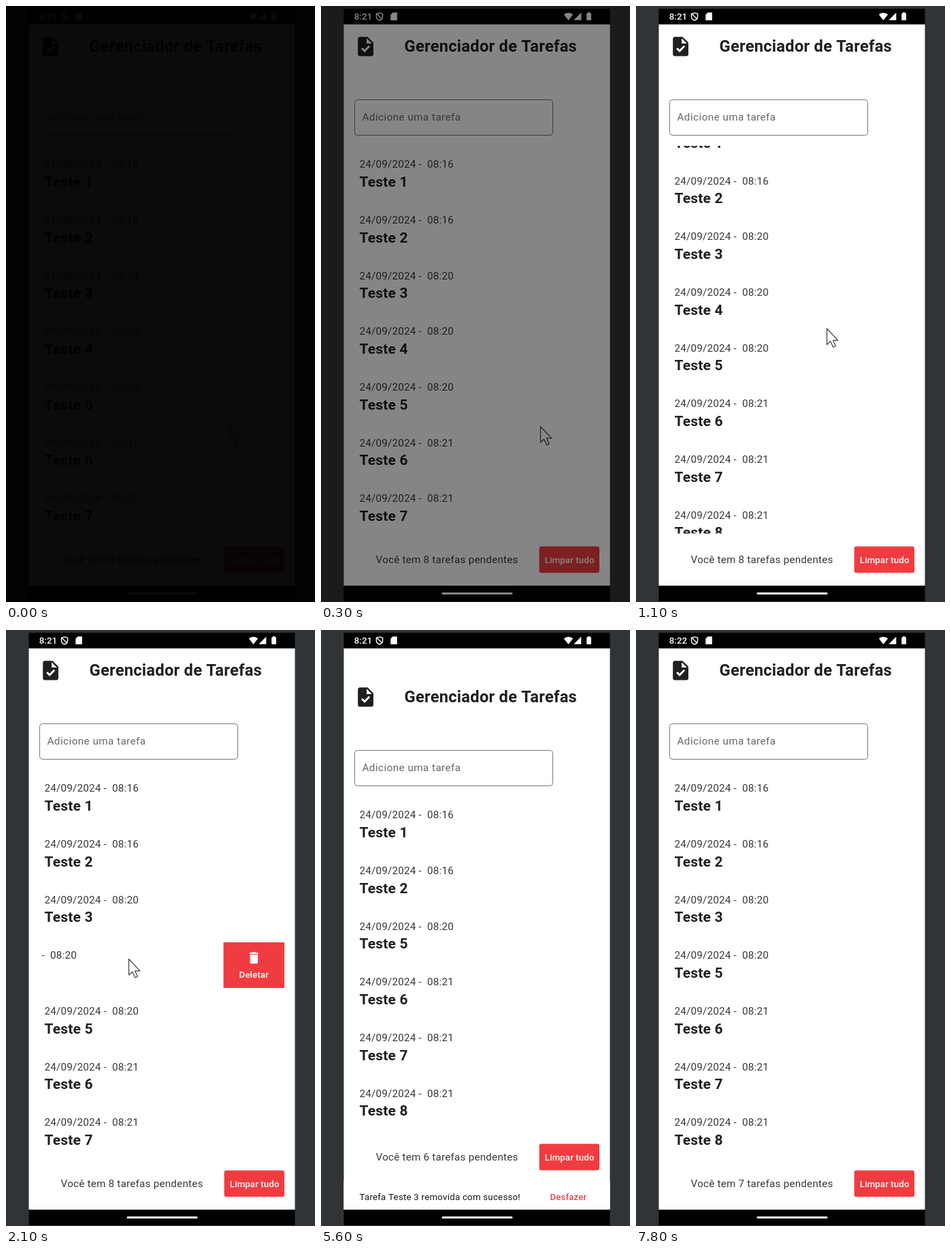
Recreate the animation shown at these times as an HTML page with a canvas. Size 454 by 874 pixels, loop 8 s.

```html
<!DOCTYPE html>
<html lang="pt-BR">
<head>
<meta charset="utf-8">
<title>Gerenciador de Tarefas</title>
<style>
html, body { margin: 0; width: 100%; height: 100%; overflow: hidden; background: #303436; }
canvas { display: block; width: 454px; height: 874px; }
</style>
</head>
<body>
<canvas id="stage"></canvas>
<script>
const W = 454, H = 874, LOOP = 8000, STEP = 100;
const RED = '#f03c40', INK = '#1f1f22', SOFT = '#37373a', WHITE = '#fff';
const LEFT = 33.5, PHONE_W = 391, BOTTOM = 850;
const LIST_TOP = 205, LIST_H = 568.6, PITCH = 81.67, ROW_H = 67;
const MAX_SCROLL = 86, MAX_SWIPE = 91, PANE_W = 89.5;
const REMOVE_4 = 2500, REMOVE_3 = 5200, UNDO = 6700, CLOCK_TICK = 6400;

const canvas = document.getElementById('stage');
const ctx = canvas.getContext('2d');
const dpr = window.devicePixelRatio || 1;
canvas.width = W * dpr;
canvas.height = H * dpr;

const TASK_ICON = new Path2D('M14 2H6c-1.1 0-1.99.9-1.99 2L4 20c0 1.1.89 2 1.99 2H18c1.1 0 2-.9 2-2V8l-6-6zm-3.06 16L7.4 14.46l1.41-1.41 2.12 2.12 4.24-4.24 1.41 1.41L10.94 18zM13 9V3.5L18.5 9H13z');
const TRASH_ICON = new Path2D('M6 19c0 1.1.9 2 2 2h8c1.1 0 2-.9 2-2V7H6v12zM19 4h-3.5l-1-1h-5l-1 1H5v2h14V4z');
const ARROW = new Path2D('M0 0V23.5L5.2 18.8 9.2 27.3 12.9 25.7 9.1 17.4H16.2Z');
const SHIELD = new Path2D('M86 10.2L90.6 11.6V15.4C90.6 18 88.8 20 86 21 83.2 20 81.4 18 81.4 15.4V11.6ZM82 11.4L90 19.4');

// Progress from 0 to 1 between two times.
const ramp = (t, a, b) => Math.min(1, Math.max(0, (t - a) / (b - a)));

const darkness = t => 0.955 * (1 - ramp(t, 0, 600));
const scrollAt = t => MAX_SCROLL * (ramp(t, 300, 500) - ramp(t, 1000, 1300));
const snackHeight = t => 46 * (ramp(t, 2400, 2700) - ramp(t, 5100, 5300) - ramp(t, UNDO, 6900))
  + 42 * ramp(t, 5300, 5600) + 4 * ramp(t, 5800, 6000);

function swipeAt(n, t) {
  if (n === 4) return MAX_SWIPE * ramp(t, 1800, 2100);
  if (n === 3 && t < REMOVE_3) return MAX_SWIPE * ramp(t, 4100, 4300);
  return 0;
}

// Each visit of the pointer: where it appears, then moves [start, end, dx, dy].
const VISITS = [
  { show: 0, hide: 2600, x: 328, y: 616, moves: [
    [0, 300, -6, 0], [300, 600, -42, -191], [1000, 1400, 0, 190],
    [1400, 1800, 30, -130], [1800, 2100, -130, -3], [2200, 2500, 185, 8]] },
  { show: 4000, hide: 5500, x: 292, y: 447, moves: [
    [4100, 4300, -292, -15], [4500, 4600, 193, 0], [5000, 5100, 170, -20], [5200, 5500, 40, 390]] },
  { show: 5900, hide: 7100, x: 352, y: 690, moves: [
    [5900, 6100, 33, 116], [6200, 6500, -23, 26], [7000, 7100, 22, -10]] }
];

function box(x, y, w, h, color, r = 0) {
  ctx.fillStyle = color;
  ctx.beginPath();
  ctx.roundRect(x, y, w, h, r);
  ctx.fill();
}

function poly(color, ...pts) {
  ctx.fillStyle = color;
  ctx.beginPath();
  for (let i = 0; i < pts.length; i += 2) ctx.lineTo(pts[i], pts[i + 1]);
  ctx.fill();
}

function text(str, x, y, size, weight, color, spacing = 0, align = 'left') {
  ctx.font = `${weight} ${size}px Roboto, sans-serif`;
  ctx.letterSpacing = spacing + 'px';
  ctx.textAlign = align;
  ctx.fillStyle = color;
  ctx.fillText(str, x, y);
}

function icon(path, x, y, scale, color) {
  ctx.save();
  ctx.translate(x, y);
  ctx.scale(scale, scale);
  ctx.fillStyle = color;
  ctx.fill(path, 'evenodd');
  ctx.restore();
}

function shifted(dy, draw) {
  ctx.save();
  ctx.translate(0, dy);
  draw();
  ctx.restore();
}

function clipped(x, y, w, h, draw) {
  ctx.save();
  ctx.beginPath();
  ctx.rect(x, y, w, h);
  ctx.clip();
  draw();
  ctx.restore();
}

function header() {
  icon(TASK_ICON, 48.5, 42.3, 1.4235, INK);
  text('Gerenciador de Tarefas', 122.6, 67, 23.7, 700, INK, 0.24);
  ctx.lineWidth = 1;
  ctx.strokeStyle = '#77777a';
  ctx.beginPath();
  ctx.roundRect(49.5, 137.5, 291, 52, 4);
  ctx.stroke();
  text('Adicione uma tarefa', 60.5, 168, 15.18, 400, '#68686b', 0.474);
}

function row(n, top, swipe) {
  const minute = n < 3 ? 16 : n < 6 ? 20 : 21;
  clipped(49.2, top, 360, ROW_H, () => {
    text(`24/09/2024 -\u00a0\u00a008:${minute}`, 56.4 - swipe, top + 24.2, 15.18, 400, SOFT, 0.24);
    text(`Teste ${n}`, 56.5 - swipe, top + 52, 20.9, 700, INK, 0.24);
    if (!swipe) return;
    const x = 409 - Math.min(swipe, PANE_W);
    box(x, top, PANE_W, ROW_H, RED);
    icon(TRASH_ICON, x + 33.4, top + 11.4, 0.949, WHITE);
    text('Deletar', x + PANE_W / 2, top + 51.5, 13.28, 500, WHITE, 0.1, 'center');
  });
}

function list(tasks, t) {
  clipped(LEFT, LIST_TOP, PHONE_W, LIST_H, () => {
    tasks.forEach((n, i) => row(n, LIST_TOP + 8 + i * PITCH - scrollAt(t), swipeAt(n, t)));
  });
}

function footer(count) {
  text(`Você tem ${count} tarefas pendentes`, 80.6, 817, 15.18, 400, SOFT, 0.24);
  box(320.6, 792.6, 88.4, 38.6, RED, 3);
  text('Limpar tudo', 365.2, 816.8, 13.28, 500, WHITE, 0.1, 'center');
}

function page(t) {
  const removed = n => n === 4 ? t >= REMOVE_4 : n === 3 && t >= REMOVE_3 && t < UNDO;
  const tasks = [1, 2, 3, 4, 5, 6, 7, 8].filter(n => !removed(n));
  // The column is centred, so a short list pulls both ends inward.
  const shift = Math.max(0, Math.round((LIST_H - tasks.length * PITCH) / 2));
  shifted(shift, () => {
    header();
    list(tasks, t);
  });
  shifted(-shift, () => footer(tasks.length));
}

function snackbar(t) {
  const h = snackHeight(t);
  if (h < 0.5) return;
  const top = BOTTOM - h;
  box(LEFT, top, PHONE_W, h, WHITE);
  text(`Tarefa Teste ${t < 5300 ? 4 : 3} removida com sucesso!`, 56.5, top + 28, 13.28, 400, '#141416', 0.24);
  ctx.globalAlpha = ramp(t, 2500, 2900);
  text('Desfazer', 336.5, top + 28, 13.28, 500, '#ea4448', 0.1);
  ctx.globalAlpha = 1;
}

function systemBars(t) {
  box(LEFT, 4, PHONE_W, 23, '#000');
  box(LEFT, BOTTOM, PHONE_W, 23, '#000');
  text(t < CLOCK_TICK ? '8:21' : '8:22', 48.8, 20, 13.3, 500, WHITE);
  ctx.strokeStyle = WHITE;
  ctx.lineWidth = 1.4;
  ctx.stroke(SHIELD);
  poly(WHITE, 105.5, 9.5, 111.8, 9.5, 111.8, 21, 102.3, 21, 102.3, 12.8);
  ctx.beginPath();
  ctx.moveTo(363.5, 21);
  ctx.lineTo(356.8, 12.4);
  ctx.quadraticCurveTo(363.5, 7.6, 370.2, 12.4);
  ctx.fill();
  poly(WHITE, 382.3, 9.8, 382.3, 20.8, 371.3, 20.8);
  box(390.2, 10.4, 6.8, 10.6, WHITE, 1);
  box(392, 9.2, 3.2, 2, WHITE);
  box(177.5, 860, 104, 3, WHITE, 1.5);
}

function pointer(t) {
  const visit = VISITS.find(v => t >= v.show && t <= v.hide);
  if (!visit) return;
  let { x, y } = visit;
  for (const [a, b, dx, dy] of visit.moves) {
    x += dx * ramp(t, a, b);
    y += dy * ramp(t, a, b);
  }
  ctx.save();
  ctx.translate(x + 0.5, y + 0.5);
  ctx.fillStyle = WHITE;
  ctx.fill(ARROW);
  ctx.strokeStyle = '#3c3c3f';
  ctx.lineWidth = 1.2;
  ctx.lineJoin = 'round';
  ctx.stroke(ARROW);
  ctx.restore();
}

function draw(t) {
  ctx.setTransform(dpr, 0, 0, dpr, 0, 0);
  box(0, 0, W, H, '#303436');
  box(LEFT, 27, PHONE_W, BOTTOM - 27, WHITE);
  page(t);
  snackbar(t);
  systemBars(t);
  pointer(t);
  box(0, 0, W, H, `rgba(0, 0, 0, ${darkness(t)})`);
}

const start = performance.now();
function frame() {
  const t = (performance.now() - start) % LOOP;
  draw(Math.floor(t / STEP) * STEP);
  requestAnimationFrame(frame);
}
frame();
</script>
</body>
</html>
```
